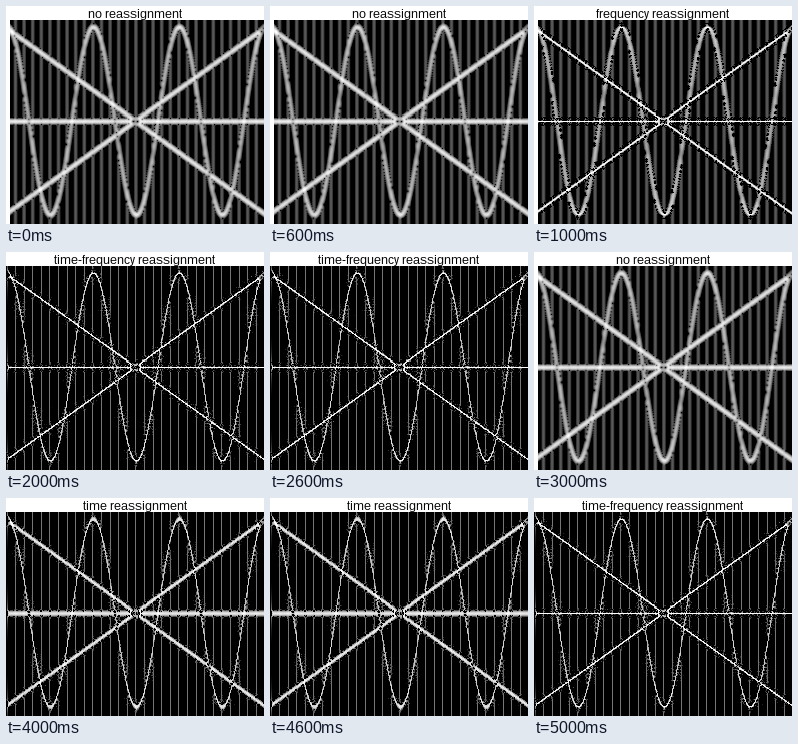
A matplotlib script for the animation above (6 s loop, 258 by 218 pixels).

```python
import numpy as np
import matplotlib as mpl
import matplotlib.pyplot as plt
from matplotlib.animation import FuncAnimation

W, H, TOP = 258, 218, 15
ROWS = H - TOP            # frequency bins, one per pixel row
NFFT = 2 * ROWS
HOP = 32                  # samples per pixel column
SIGMA = 1.41 * HOP        # window width in samples
MID, RANGE = 102.0, 34.0  # centre bin, dynamic range in dB
PAD = 8                   # extra columns before the left edge


def build_signal():
    x = np.arange(-PAD * HOP, (W + PAD) * HOP) / HOP
    u = x - 129
    bins = [
        0 * u + MID,
        MID + 0.716 * u,
        MID - 0.716 * u,
        MID + 93.5 * np.cos(2 * np.pi * (x - 1) / 86),
    ]
    sig = sum(np.exp(2j * np.pi * np.cumsum(b) / NFFT) for b in bins)
    sig[(x < 1)] = 0
    for p in np.arange(9, W, 8.6):
        sig[int(round((p + PAD) * HOP))] += 13
    return sig


def stft(sig, win, cols):
    start = (cols + PAD) * HOP - NFFT // 2
    idx = start[:, None] + np.arange(NFFT)
    seg = np.where((idx >= 0) & (idx < len(sig)),
                   sig[np.clip(idx, 0, len(sig) - 1)], 0)
    return np.fft.fft(seg * win, axis=1)[:, :ROWS]


def spectrogram(sig, move_time, move_freq):
    cols = np.arange(1 if move_time else 4, W)
    n = np.arange(NFFT) - NFFT // 2
    win = np.exp(-0.5 * (n / SIGMA) ** 2)
    s = stft(sig, win, cols)
    s_t = stft(sig, win * n, cols)
    s_d = stft(sig, -win * n / SIGMA ** 2, cols)
    safe = np.where(np.abs(s) < 1e-9, 1e-9, s)

    t, f = np.meshgrid(cols, np.arange(ROWS), indexing="ij")
    if move_time:
        t = t + (s_t / safe).real / HOP
    if move_freq:
        f = f - (s_d / safe).imag * NFFT / (2 * np.pi)
    ti, fi = np.rint(t).astype(int), np.rint(f).astype(int)
    ok = (ti >= 0) & (ti < W) & (fi >= 0) & (fi < ROWS)

    power = np.zeros((ROWS, W))
    np.add.at(power, (ROWS - 1 - fi[ok], ti[ok]), np.abs(s[ok]) ** 2)
    db = 10 * np.log10(power / win.sum() ** 2 + 1e-12)
    img = np.ones((H, W))
    left = 0 if move_time else 4
    img[TOP:, left:] = np.clip(0.9 + db / RANGE, 0, 1)[:, left:]
    return img


signal = build_signal()
modes = {
    "no reassignment": (False, False),
    "frequency reassignment": (False, True),
    "time reassignment": (True, False),
    "time-frequency reassignment": (True, True),
}
images = {name: spectrogram(signal, *m) for name, m in modes.items()}
order = [
    "no reassignment", "frequency reassignment", "time-frequency reassignment",
    "no reassignment", "time reassignment", "time-frequency reassignment",
]

mpl.rcParams.update({"text.hinting": "native", "text.hinting_factor": 1})
fig = plt.figure(figsize=(W / 100, H / 100), dpi=100, facecolor="white")
ax = fig.add_axes([0, 0, 1, 1])
ax.axis("off")
view = ax.imshow(images[order[0]], cmap="gray", vmin=0, vmax=1,
                 interpolation="nearest", extent=(0, W, H, 0), aspect="auto")
title = ax.text(129, 11.5, "", ha="center", va="baseline", color="black",
                family="Liberation Sans", fontsize=8.64)


def update(i):
    name = order[i % len(order)]
    view.set_data(images[name])
    title.set_text(name)
    return view, title


anim = FuncAnimation(fig, update, frames=6, interval=1000, repeat=True,
                     repeat_delay=0)
plt.show()
```
